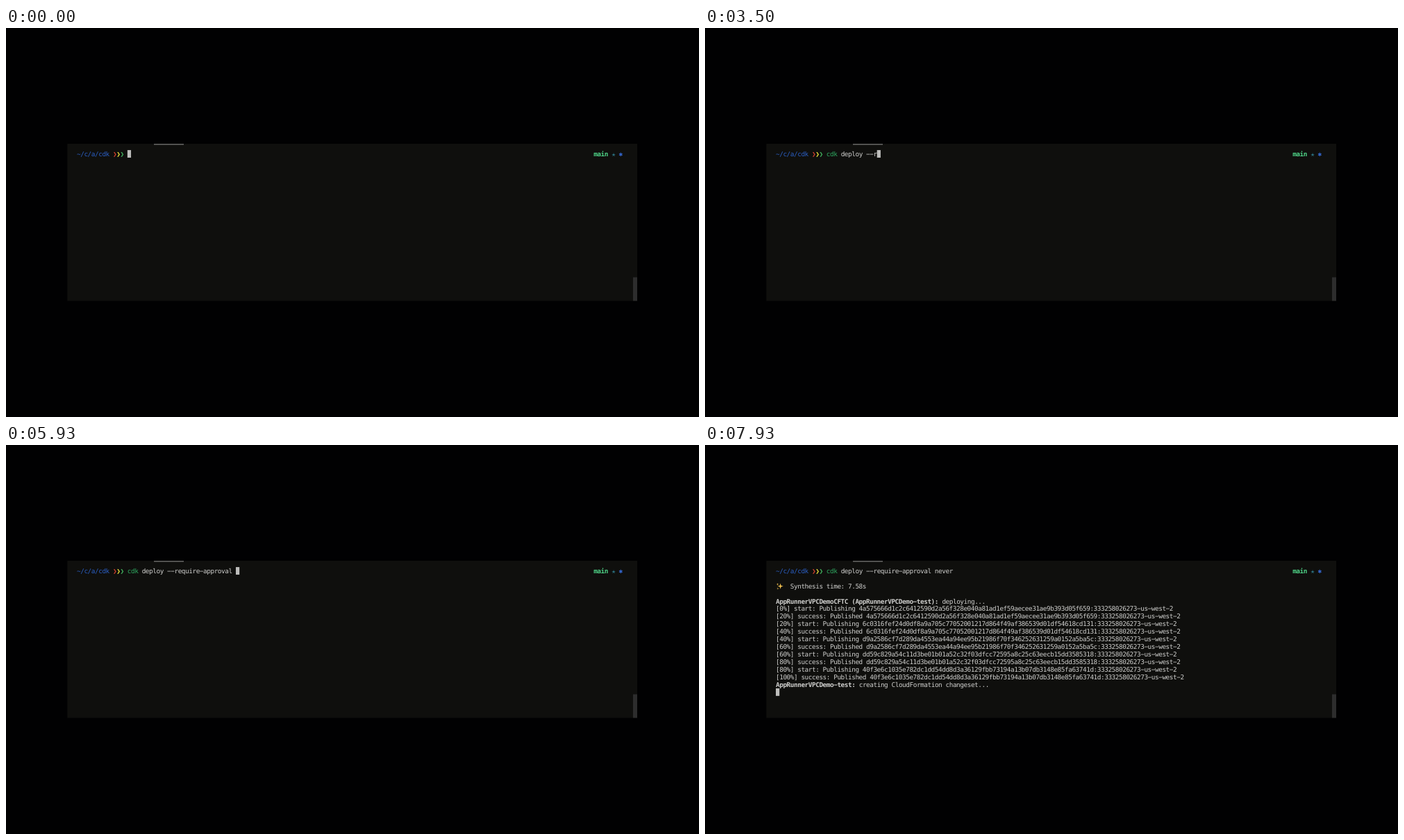
An HTML page that plays this animation: 998x561 px, repeating every 8 s.

```html
<!DOCTYPE html>
<html lang="en">
<head>
<meta charset="utf-8">
<title>Terminal deploy</title>
<style>
  html, body { margin: 0; width: 100%; height: 100%; overflow: hidden; background: #000; }
  svg { display: block; }
  /* The terminal sets its type tighter than the natural advance */
  text {
    font: 9.367px "DejaVu Sans Mono", monospace;
    letter-spacing: -0.435px;
    text-rendering: geometricPrecision;
    white-space: pre;
  }
  .bold { font-weight: bold; }
</style>
</head>
<body>
<svg id="stage" width="998" height="561" viewBox="0 0 998 561">
  <rect width="998" height="561" fill="#010102"/>
  <rect x="88.3" y="167" width="820.7" height="226.6" fill="#0f0f0d"/>
  <rect x="213" y="167.3" width="43" height="1.04" fill="#8f8f8d"/>
  <rect x="903" y="359.5" width="6" height="34" fill="#2d2d2d"/>
</svg>
<script>
const LOOP = 8000;
const LEFT = 102, TOP = 176.07, COL = 5.204, ROW = 10.928, BASE = 8.75;
const WHITE = '#cfcfcd', GREEN = '#2fa860', RED = '#d8412f';
const COMMAND = 'cdk deploy --require-approval never';
const PROMPT = 14;

// Time at which each character of the command appears
const KEYS = [
  1060, 1300, 1460, 1600, 1830, 2030, 2130, 2300, 2460, 2600, 2700,
  3130, 3360, 3500, 3730, 3900, 4030, 4200, 4300, 4360, 4630, 4900, 5030,
  5200, 5330, 5430, 5560, 5730, 5830, 5930, 6100, 6160, 6300, 6400, 6530
];
const ENTER = 7200, FIRST_OUTPUT = 7900, ALL_OUTPUT = 7930;

const stage = document.getElementById('stage');
const colX = col => LEFT + col * COL;
const rowY = row => TOP + row * ROW;

function add(tag, attrs, parent = stage) {
  const node = document.createElementNS('http://www.w3.org/2000/svg', tag);
  for (const key in attrs) node.setAttribute(key, attrs[key]);
  parent.append(node);
  return node;
}

// The terminal face has wide hyphens
const wide = text => text.replaceAll('-', '\u2212');

function write(text, col, row, color = WHITE, bold = false, parent = stage) {
  const node = add('text', { x: colX(col), y: rowY(row) + BASE, class: bold ? 'bold' : '' }, parent);
  node.style.fill = color;
  node.textContent = wide(text);
  return node;
}

function sparkle(cx, cy, r, parent) {
  const k = r * 0.22;
  add('path', {
    d: `M${cx} ${cy - r}l${k} ${r - k}l${r - k} ${k}l${k - r} ${k}l${-k} ${r - k}` +
       `l${-k} ${k - r}l${k - r} ${-k}l${r - k} ${-k}Z`,
    fill: '#f6c552'
  }, parent);
}

// Prompt
write('~/c/a/cdk', 0, 0, '#2b5fc4');
[RED, '#f0e83c', '#43b862'].forEach((color, i) => write('❯', 10 + i, 0, color));
write('main', 143, 0, '#4fd488', true);
write('✭', 148, 0, '#3aa0b8');
write('✱', 150, 0, '#3467cf');

const command = write('', PROMPT, 0, GREEN);
const args = write('', PROMPT + 3, 0);
const cursor = add('rect', { width: COL, height: ROW, fill: '#bdbdbb' });

// Output, in two bursts
const early = add('g', {}), late = add('g', {});
sparkle(108.6, 203.6, 4.2, early);
sparkle(104.6, 200.9, 1.9, early);
sparkle(104.9, 207, 1.7, early);
write('Synthesis time: 7.58s', 4, 2, WHITE, false, early);
write('AppRunnerVPCDemoCFTC (AppRunnerVPCDemo-test):', 0, 4, WHITE, true, early);
write('deploying...', 46, 4, WHITE, false, early);

const ASSETS = [
  '4a575666d1c2c6412590d2a56f328e040a81ad1ef59aecee31ae9b393d05f659',
  '6c0316fef24d0df8a9a705c77052001217d864f49af386539d01df54618cd131',
  'd9a2586cf7d289da4553ea44a94ee95b21986f70f346252631259a0152a5ba5c',
  'dd59c829a54c11d3be01b01a52c32f03dfcc72595a8c25c63eecb15dd3585318',
  '40f3e6c1035e782dc1dd54dd8d3a36129fbb73194a13b07db3148e85fa63741d'
];
ASSETS.forEach((hash, i) => {
  const id = hash + ':333258026273-us-west-2';
  write(`[${i * 20}%] start: Publishing ${id}`, 0, 5 + i * 2, WHITE, false, late);
  write(`[${i * 20 + 20}%] success: Published ${id}`, 0, 6 + i * 2, WHITE, false, late);
});
write('AppRunnerVPCDemo-test:', 0, 15, WHITE, true, late);
write('creating CloudFormation changeset...', 23, 15, WHITE, false, late);

function draw(t) {
  const typed = KEYS.filter(k => t >= k).length;
  command.textContent = COMMAND.slice(0, Math.min(typed, 3));
  command.style.fill = typed === 1 ? RED : GREEN;
  args.textContent = wide(COMMAND.slice(3, Math.max(typed, 3)));

  early.style.display = t >= FIRST_OUTPUT ? '' : 'none';
  late.style.display = t >= ALL_OUTPUT ? '' : 'none';

  const row = t >= ALL_OUTPUT ? 16 : t >= FIRST_OUTPUT ? 5 : t >= ENTER ? 1 : 0;
  cursor.setAttribute('x', colX(row ? 0 : PROMPT + typed));
  cursor.setAttribute('y', rowY(row));
}

const start = performance.now();
function tick() {
  draw((performance.now() - start) % LOOP);
  requestAnimationFrame(tick);
}
tick();
</script>
</body>
</html>
```
